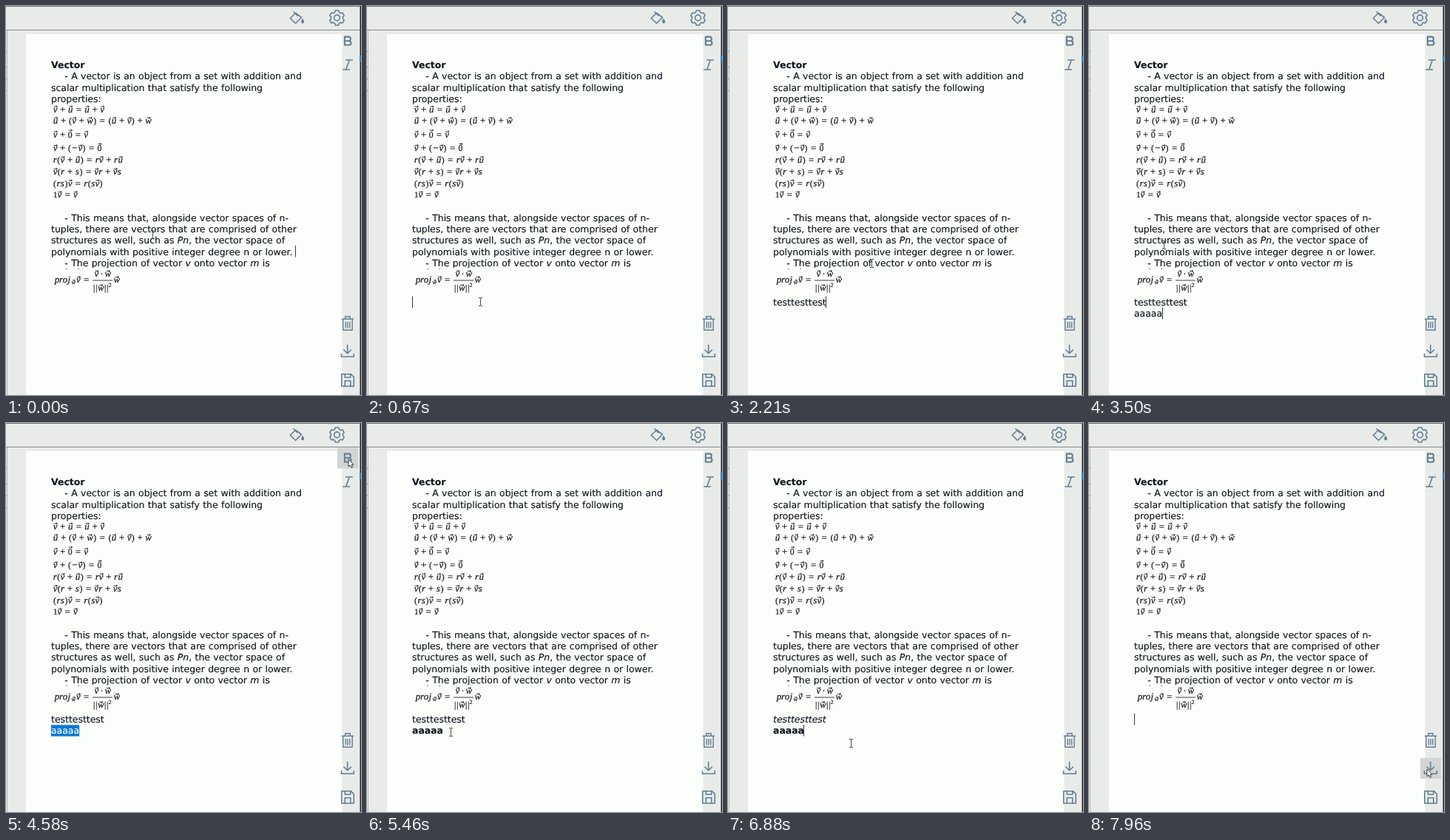
An HTML page for the animation above (8000 ms loop, 480 px wide and 526 px high).

```html
<!DOCTYPE html>
<html lang="en">
<head>
<meta charset="utf-8">
<title>Notes editor</title>
<style>
html, body { margin: 0; width: 100%; height: 100%; overflow: hidden; background: #e9ebe9; }
svg { display: block; }
text { white-space: pre; text-rendering: geometricPrecision; }
.body text { font: 12.45px "DejaVu Sans", sans-serif; word-spacing: .43px; fill: #0f171d; stroke: #0f171d; stroke-width: .15; }
.body .marked { fill: #fff; stroke: #fff; }
.math text { font-family: "Liberation Serif", serif; fill: #14181b; stroke: #14181b; stroke-width: .2; }
.math path { fill: none; stroke: #14181b; stroke-width: .85; }
.icon { fill: none; stroke: #627f92; stroke-width: 1.6; stroke-linejoin: round; }
</style>
</head>
<body>
<svg id="stage" width="480" height="526" viewBox="0 0 480 526">
  <rect width="480" height="526" fill="#e9ebe9"/>
  <rect width="480" height="1" fill="#6b7072"/>
  <rect y="32" width="478" height="1" fill="#858b8d"/>
  <rect x="1" y="33" width="1" height="493" fill="#b4b8b8"/>
  <rect x="478" width="1" height="526" fill="#8b9092"/>
  <rect x="479" width="1" height="526" fill="#26292b"/>
  <rect x="478" y="67" width="2" height="9" fill="#2787cf"/>
  <path d="M0 61.500h1M0 82.500h1M0 98.500h1M0 114.500h1" stroke="#777c7e"/>
  <rect x="27" y="38" width="427.500" height="488" fill="#fbfefb"/>
  <rect id="hover" x="448" width="28" height="28" fill="#d2d5d3"/>

  <g class="icon">
    <path d="M391.500 9.500l-7.200 7 7.200 7 8-8zM388.500 7.500l6 6"/>
    <path d="M401 17.500c-2 3.400-1.800 5.500.200 5.500s2-2.100-.200-5.500z" fill="#627f92" stroke-width="1"/>
    <path id="gear"/>
    <circle cx="447.500" cy="16" r="3.900"/>
    <path d="M457.900 47.200h5.800a2.700 2.700 0 0 1 0 5.600h-5.800V41.600h5.200a2.700 2.700 0 0 1 0 5.600" stroke-width="2.100"/>
    <path d="M459 73h9.800M455.200 86h9.800M464.300 73L459.700 86"/>
    <path d="M453.800 423.300h16.400M458.800 423v-3.200h6.400v3.200M455.800 423.500v14.800h12.400v-14.800M459.300 427v8.500M462 427v8.500M464.700 427v8.500" stroke-width="1.400"/>
    <path d="M461.700 458v11.500M456.500 464.700l5.200 5.100 5.200-5.100M453.500 470v4.300h16.800v-4.300"/>
    <path d="M453.800 497.800h12.700l3.800 3.800v12.700h-16.500zM458.300 498v4.300h7.500v-4.300M458.300 514v-7.200h7.500v7.200"/>
  </g>

  <g class="body" id="notes"></g>
  <rect x="60" y="354" width="110" height="37" fill="#fbfefb"/>
  <path d="M81.500 355.400h1.500M97.500 355.400h1.500" stroke="#555b5f"/>
  <g class="math" id="math" transform="translate(0 -.7)"></g>
  <g class="body" id="typed"></g>
  <rect id="caret" width="1" height="15.500" fill="#30383e"/>
  <path id="beam" d="M-2.500 -5.500h2l.5.5.5-.5h2M0 -5V5M-2.500 5.500h2l.5-.5.5.5h2" fill="none" stroke="#33383b" stroke-width=".9"/>
  <path id="arrow" d="M0 0V10L2.300 8 4 11.500 5.700 10.700 4.100 7.300H7z" fill="#fff" stroke="#22282c" stroke-width=".9"/>
</svg>
<script>
const NS = "http://www.w3.org/2000/svg";
const $ = id => document.getElementById(id);
const LEFT = 61, INDENT = 79.3, EM = 11.75;

function add(parent, tag, attrs, text) {
  const el = document.createElementNS(NS, tag);
  for (const k in attrs) el.setAttribute(k, attrs[k]);
  if (text) el.textContent = text;
  parent.appendChild(el);
  return el;
}

// A slash pair marks italics.
function note(y, str, x = LEFT, weight = "normal") {
  const line = add($("notes"), "text", { x, y, style: "font-weight:" + weight });
  str.split("/").forEach((s, i) => s && add(line, "tspan", { "font-style": i % 2 ? "italic" : "normal" }, s));
}
note(83.7, "Vector", LEFT, "bold");
note(99.2, "- A vector is an object from a set with addition and", INDENT);
note(114.7, "scalar multiplication that satisfy the following");
note(130.2, "properties:");
note(290.6, "- This means that, alongside vector spaces of n-", INDENT);
note(306, "tuples, there are vectors that are comprised of other");
note(321.4, "structures as well, such as /Pn/, the vector space of");
note(336.8, "polynomials with positive integer degree n or lower.");
note(352.2, "- The projection of vector /v/ onto vector /m/ is", INDENT);

// Advance widths in em; V, U, W, O are letters under an arrow.
const adv = { v: .485, u: .572, w: .716, r: .451, s: .469, p: .503, o: .485, j: .412,
  0: .5, 1: .5, 2: .5, "(": .389, ")": .389, "|": .278, "−": .778, "+": 1.222, "=": 1.334, "·": .722 };
const arrowed = { V: "v", U: "u", W: "w", O: "0" };

function formula(x, y, str, em = EM) {
  const g = $("math");
  for (const c of str) {
    const ch = arrowed[c] || c, w = adv[ch] * em, letter = /[a-z]/.test(ch);
    add(g, "text", { x: x + w / 2, y, "text-anchor": "middle", "font-size": /[a-z+=−]/.test(ch) ? em * 1.1 : em,
      "font-style": letter ? "italic" : "normal" }, ch);
    if (arrowed[c]) {
      const ay = y - em * (letter ? .66 : .83), k = em / EM, ax = x + w / 2 + .4;
      add(g, "path", { d: `M${ax - 2.4 * k} ${ay}h${4.8 * k}m${-1.7 * k} ${-1.3 * k}l${1.7 * k} ${1.3 * k}l${-1.7 * k} ${1.3 * k}` });
    }
    x += w;
  }
}
[[144.5, "V+U=U+V"], [159.8, "U+(V+W)=(U+V)+W"], [178.5, "V+O=V"], [197, "V+(−V)=O"],
 [212.7, "r(V+U)=rV+rU"], [228.7, "V(r+s)=Vr+Vs"], [244.3, "(rs)V=r(sV)"], [260, "1V=V"]
].forEach(([y, s]) => formula(63.7, y, s));
formula(66, 375, "proj");
formula(88.5, 376.8, "W", 7.8);
formula(95, 375, "V=");
formula(119.5, 367, "V·W");
formula(117.5, 386, "||W||");
formula(138.5, 380.5, "2", 8);
formula(145.5, 375, "W");
add($("math"), "path", { d: "M117 371.700H144" });

// Six teeth, each a flat top between two valley corners.
let cog = "";
for (let i = 0; i < 6; i++) {
  for (const [deg, r] of [[-23, 8], [-12, 10.2], [12, 10.2], [23, 8]]) {
    const a = (i * 60 - 90 + deg) * Math.PI / 180;
    cog += (cog ? "L" : "M") + (447.5 + r * Math.cos(a)).toFixed(2) + " " + (16 + r * Math.sin(a)).toFixed(2);
  }
}
$("gear").setAttribute("d", cog + "Z");

function editable(y) {
  const box = add($("typed"), "rect", { y: y - 12, height: 15.3, fill: "#0a78d4" });
  const line = add($("typed"), "text", { x: LEFT, y });
  return { box, line, plain: add(line, "tspan", {}), marked: add(line, "tspan", { class: "marked" }) };
}
const rows = [editable(405), editable(420.3)];

// Shows str with its last `sel` characters selected; returns the right edge.
function setRow(row, str, sel, style) {
  const cut = str.length - sel;
  row.line.setAttribute("style", style);
  row.plain.textContent = str.slice(0, cut);
  row.marked.textContent = "";
  const from = row.line.getComputedTextLength();
  row.marked.textContent = str.slice(cut);
  const to = row.line.getComputedTextLength();
  row.box.setAttribute("x", LEFT + from);
  row.box.setAttribute("width", to - from);
  return LEFT + to;
}

const mouse = [[0, 198, 309], [40, 198, 309], [420, 152, 401], [620, 152, 401], [1340, 194, 348], [2800, 194, 348],
  [3480, 101, 323], [3580, 101, 323], [3780, 105, 419], [3860, 105, 419], [4060, 43, 427], [4120, 43, 427],
  [4330, 398, 57], [4540, 463, 49], [4740, 463, 49], [5220, 283, 240], [5440, 113, 418], [5580, 113, 418],
  [5700, 136, 402], [5760, 136, 402], [5980, 53, 402], [6080, 53, 402], [6420, 461, 78], [6560, 461, 78],
  [6850, 166, 433], [6940, 166, 433], [7260, 48, 400], [7480, 48, 400], [7710, 190, 425], [7920, 457, 468], [8000, 457, 468]];

function pointer(t) {
  const i = mouse.findIndex(k => k[0] > t), [t0, x0, y0] = mouse[i - 1], [t1, x1, y1] = mouse[i];
  const p = (t - t0) / (t1 - t0), e = p * p * (3 - 2 * p);
  return [x0 + (x1 - x0) * e, y0 + (y1 - y0) * e];
}

const count = (t, start, step, max) => Math.max(0, Math.min(max, Math.floor((t - start) / step) + 1));
const ramp = (t, a, b) => Math.max(0, Math.min(1, (t - a) / (b - a)));
const place = (id, x, y) => $(id).setAttribute("transform", `translate(${x.toFixed(1)} ${y.toFixed(1)})`);
const show = (id, on) => $(id).setAttribute("visibility", on ? "visible" : "hidden");

function draw(t) {
  const gone = t >= 7440;
  const n1 = gone ? 0 : count(t, 920, 110, 4) + count(t, 1710, 46, 7) + (t >= 2210 ? 1 : 0);
  const n2 = gone ? 0 : count(t, 2920, 85, 5);
  let sel1 = 0, sel2 = 0;
  if (t >= 3860 && t < 5400) sel2 = Math.round(5 * ramp(t, 3880, 4020));
  if (t >= 5760 && t < 6820) sel1 = Math.round(12 * ramp(t, 5770, 5960));
  if (t >= 6940 && !gone) {
    sel2 = Math.round(5 * ramp(t, 7020, 7160));
    sel1 = Math.round(12 * ramp(t, 7160, 7250));
  }
  const end1 = setRow(rows[0], "testtesttest".slice(0, n1), sel1, t >= 6480 ? "font-style:italic" : "");
  const end2 = setRow(rows[1], "aaaaa".slice(0, n2), sel2, t >= 4660 ? "font-weight:bold" : "");

  const second = t >= 2750 && !gone;
  const cx = t < 480 ? 391 : second ? end2 : end1, cy = t < 480 ? 324 : second ? 408 : 392.7;
  place("caret", Math.floor(cx), cy);
  show("caret", !(t >= 3860 && t < 6820) && !sel1 && !sel2);

  const [x, y] = pointer(t), over = x >= 448;
  place("beam", Math.round(x) + .5, Math.round(y));
  place("arrow", x, y);
  show("beam", x < 454);
  show("arrow", x >= 454);
  const top = [33.5, 66, 453].find(v => y >= v && y < v + 28);
  show("hover", over && top !== undefined);
  if (top !== undefined) $("hover").setAttribute("y", top);
}

function tick(now) {
  draw(now % 8000);
  requestAnimationFrame(tick);
}
draw(0);
requestAnimationFrame(tick);
</script>
</body>
</html>
```
